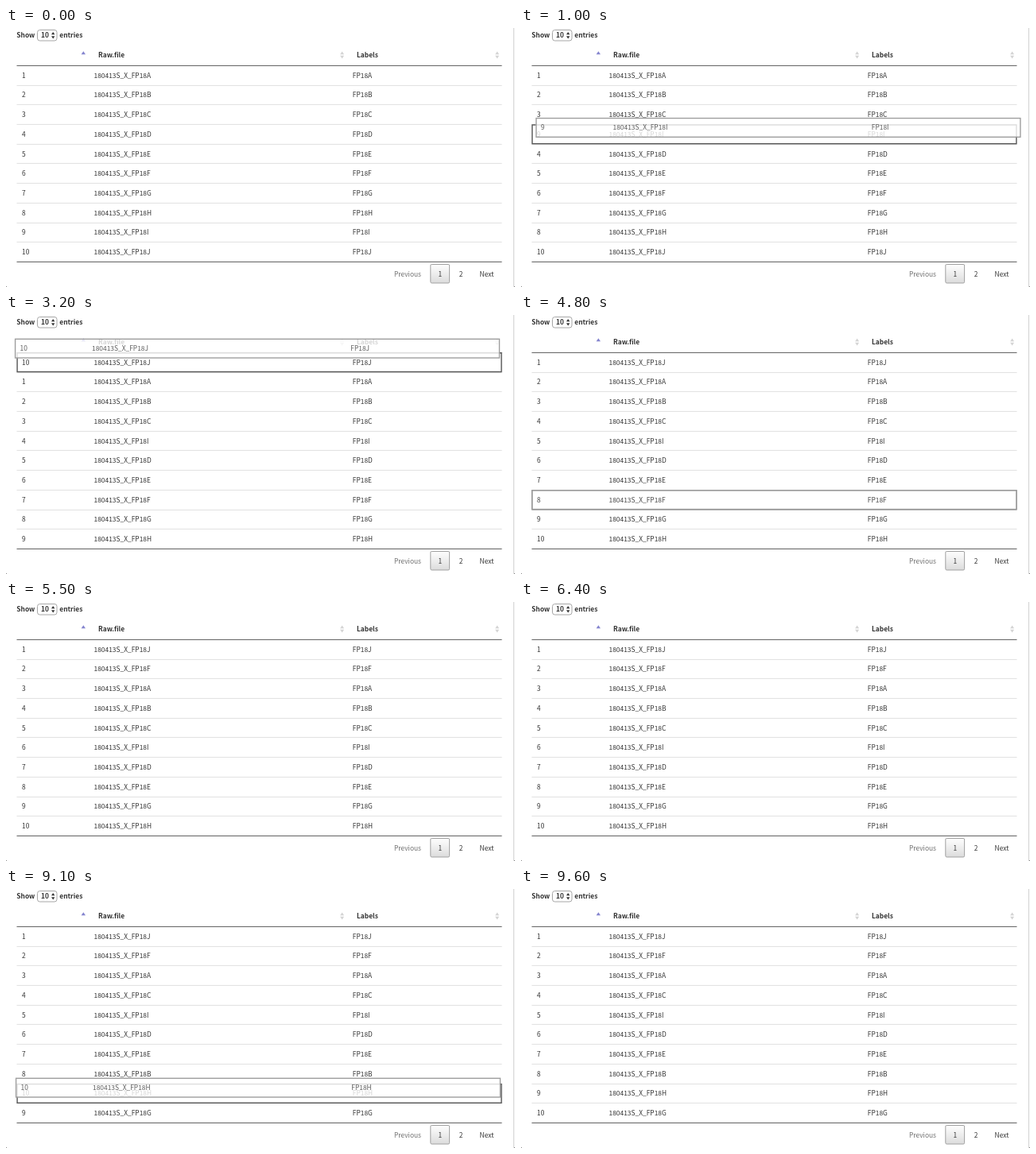
Write an HTML page with a canvas that moves like this. It is 640x326 px and loops after 9900 ms.

```html
<!DOCTYPE html>
<html lang="en">
<head>
<meta charset="utf-8">
<title>Row reordering</title>
<style>
html, body { margin: 0; width: 100%; height: 100%; overflow: hidden; background: #fff; }
canvas { display: block; width: 640px; height: 326px; }
</style>
</head>
<body>
<canvas id="stage" width="640" height="326"></canvas>
<script>
const ctx = document.getElementById('stage').getContext('2d');
const LOOP = 9900, TICK = 100;
const LEFT = 13.5, WIDTH = 610, TOP = 47.2, PITCH = 24.72;
const FAMILY = '"Noto Sans CJK JP", "Noto Sans CJK SC", "Noto Sans CJK", "Open Sans", sans-serif';
const SIZE = 8.42;

// Each drag lifts one row, carries it by (dx, dy) and drops it; the table may dim once when it reloads.
const drags = [
  { from: 8, start: 600,  arrive: 1000, drop: 1200, reload: 1600, dx: 5,    dy: -132 },
  { from: 9, start: 2600, arrive: 3200, drop: 3500, reload: 3900, dx: -2.5, dy: -240 },
  { from: 7, start: 4800, arrive: 5300, drop: 5500, reload: 5700, dx: -9,   dy: -150 },
  { from: 3, start: 6900, arrive: 7200, drop: 7500, reload: -1,   dx: 2.5,  dy: 104 },
  { from: 9, start: 8900, arrive: 9100, drop: 9400, reload: 9500, dx: -1.5, dy: -32 }
];

const clamp = (v, lo, hi) => Math.max(lo, Math.min(hi, v));
const ease = p => p * p * (3 - 2 * p);
const rowTop = i => TOP + i * PITCH;

function text(str, x, y, { bold = false, color = '#333', align = 'left' } = {}) {
  ctx.font = `${bold ? 'bold ' : ''}${SIZE}px ${FAMILY}`;
  ctx.textAlign = align;
  ctx.fillStyle = color;
  ctx.fillText(str, x, y + 3.1);
}

function rule(y, color) {
  ctx.fillStyle = color;
  ctx.fillRect(LEFT, Math.round(y) - 0.1, WIDTH, 1);
}

function triangle(x, y, w, h, color) {
  ctx.fillStyle = color;
  ctx.beginPath();
  ctx.moveTo(x - w / 2, y);
  ctx.lineTo(x + w / 2, y);
  ctx.lineTo(x, y - h);
  ctx.fill();
}

function roundBox(x, y, w, h, r, fill, stroke) {
  ctx.beginPath();
  ctx.roundRect(x, y, w, h, r);
  ctx.fillStyle = fill;
  ctx.fill();
  ctx.strokeStyle = stroke;
  ctx.lineWidth = 1;
  ctx.stroke();
}

function outline(y, color) {
  ctx.strokeStyle = color;
  ctx.lineWidth = 1.4;
  ctx.strokeRect(LEFT + 0.6, y + 0.6, WIDTH - 1.2, PITCH - 1);
}

function cells(row, y) {
  const mid = y + PITCH / 2;
  text(row.index, 20, mid);
  text('180413S_X_FP18' + row.letter, 110.5, mid);
  text('FP18' + row.letter, 435.8, mid);
}

function sortBoth(x) {
  triangle(x, 33.2, 5, 3.6, '#d4d4d4');
  triangle(x, 34.8, 5, -3.6, '#d4d4d4');
}

function controls() {
  text('Show', 13.3, 9, { bold: true });
  roundBox(39.5, 2.5, 24.5, 13.5, 3, '#fff', '#a6a6a6');
  text('10', 44, 9.3, { bold: true });
  triangle(59.2, 8.3, 4.4, 3.2, '#333');
  triangle(59.2, 10.3, 4.4, -3.2, '#333');
  text('entries', 67.3, 9, { bold: true });
}

function header() {
  triangle(97.3, 33.2, 5.4, 4, '#8585cf');
  text('Raw.file', 116, 33.7, { bold: true });
  sortBoth(422.6);
  text('Labels', 441, 33.7, { bold: true });
  sortBoth(617.6);
}

function pager() {
  const fade = ctx.createLinearGradient(0, 297, 0, 321);
  fade.addColorStop(0, '#fff');
  fade.addColorStop(1, '#dcdcdc');
  roundBox(533.8, 297.5, 23.8, 23.5, 1.5, fade, '#a0a0a0');
  text('Previous', 488, 309.5, { color: '#707070' });
  text('1', 545.8, 309.5, { align: 'center' });
  text('2', 572, 309.5, { align: 'center' });
  text('Next', 595.6, 309.5);
}

function pageEdge() {
  ctx.fillStyle = '#d2d2d2';
  ctx.fillRect(638, 0, 1, 326);
  ctx.fillStyle = '#8a8a8a';
  ctx.fillRect(0, 325, 1, 1);
  ctx.fillRect(639, 325, 1, 1);
}

function move(list, from, to) {
  list.splice(to, 0, ...list.splice(from, 1));
}

const target = (d, dy) => clamp(Math.round(d.from + dy / PITCH), 0, 9);

function stateAt(t) {
  const rows = [...'ABCDEFGHIJ'].map((letter, i) => ({ letter, index: i + 1 }));
  let held = null, dim = false;
  for (const d of drags) {
    if (t < d.start) break;
    const p = ease(clamp((t - d.start) / (d.arrive - d.start), 0, 1));
    const row = rows[d.from], index = row.index;
    const slot = target(d, d.dy * p);
    move(rows, d.from, slot);
    if (t < d.drop) {
      held = { row: { letter: row.letter, index }, slot, x: d.dx * p, y: rowTop(d.from) + d.dy * p };
    } else {
      rows.forEach((r, i) => { r.index = i + 1; });
      dim = t >= d.reload && t < d.reload + TICK && d.reload > 0;
    }
  }
  return { rows, held, dim };
}

function floatRow(held) {
  ctx.save();
  ctx.translate(held.x, 0);
  ctx.globalAlpha = 0.8;
  ctx.fillStyle = '#fff';
  ctx.fillRect(LEFT, held.y, WIDTH, PITCH);
  outline(held.y, '#888');
  cells(held.row, held.y);
  ctx.restore();
}

function draw(t) {
  const { rows, held, dim } = stateAt(t);
  ctx.globalAlpha = 1;
  ctx.fillStyle = '#fff';
  ctx.fillRect(0, 0, 640, 326);
  pageEdge();
  ctx.globalAlpha = dim ? 0.45 : 1;
  controls();
  header();
  rows.forEach((row, i) => {
    if (i) rule(rowTop(i) - 0.4, '#e0e0e0');
    cells(row, rowTop(i));
  });
  rule(TOP - 0.4, '#5c5c5c');
  rule(rowTop(10) - 0.4, '#5c5c5c');
  pager();
  if (held) {
    outline(rowTop(held.slot), '#555');
    floatRow(held);
  }
}

function frame(now) {
  draw(Math.floor((now % LOOP) / TICK) * TICK);
  requestAnimationFrame(frame);
}
draw(0);
requestAnimationFrame(frame);
</script>
</body>
</html>
```
